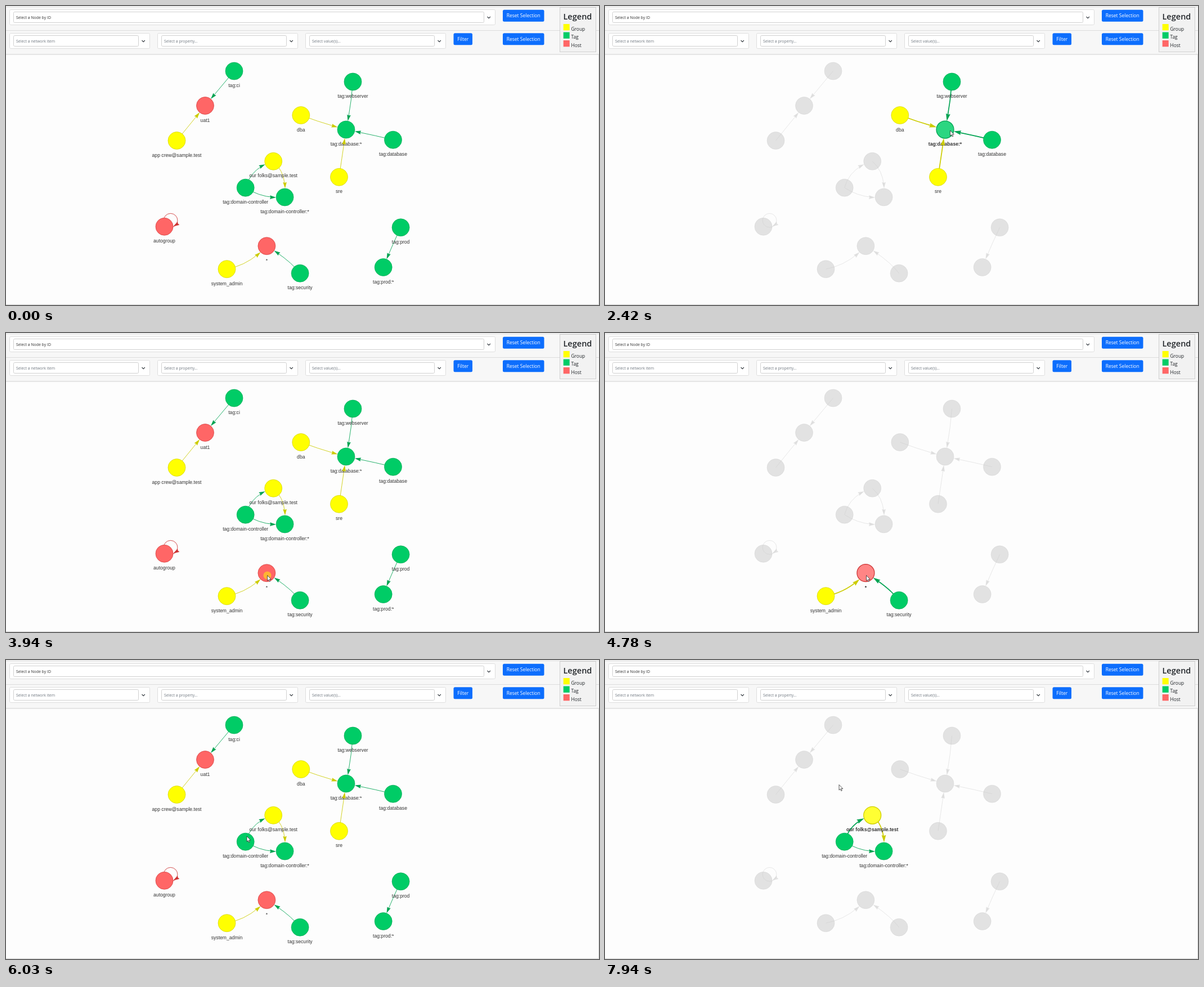
Animation, 1054 px wide and 531 px high, one loop 8000 ms. Source, as an HTML page:

```html
<!DOCTYPE html>
<html lang="en">
<head>
<meta charset="utf-8">
<title>Access graph</title>
<style>
  html, body { margin: 0; width: 100%; height: 100%; overflow: hidden; background: #fdfdfd; }
  svg { display: block; width: 1054px; height: 531px; }
  #bar text { font-family: "Open Sans", "Noto Sans", sans-serif; fill: #212529; }
  #graph text { font: 8.65px "Liberation Sans", Arial, sans-serif; fill: #343434; text-anchor: middle; }
  #graph text.picked { font-weight: bold; }
</style>
</head>
<body>
<svg viewBox="0 0 1054 531">
  <rect width="1054" height="531" fill="#fdfdfd"/>
  <g id="bar"></g>
  <g id="graph"></g>
  <circle id="click" r="7" fill="#ff0" fill-opacity=".5"/>
  <path id="cursor" d="M0 0V9.6L2.2 7.6L3.8 11L5.3 10.3L3.8 7H6.8Z" fill="#fff" stroke="#222" stroke-width=".75"/>
</svg>
<script>
const LOOP = 8000, R = 15.5, FADED = 'rgba(200,200,200,.5)';
const el = id => document.getElementById(id);

// fill, border and edge, fill when selected
const palette = {
  yellow: ['#ffff00', '#cccc00', '#ffff33'],
  green: ['#00cc66', '#00a352', '#2bd681'],
  red: ['#ff6666', '#cc3333', '#ff8585']
};

const nodes = {
  ci: [405.5, 115.5, 'green', 'tag:ci'],
  uat: [354, 177, 'red', 'uat1'],
  dev: [303.5, 239, 'yellow', 'app crew@sample.test'],
  web: [616.5, 134.5, 'green', 'tag:webserver'],
  dba: [524.3, 194, 'yellow', 'dba'],
  dbAll: [604.5, 219.5, 'green', 'tag:database:*'],
  db: [688, 237.7, 'green', 'tag:database'],
  sre: [592, 303.8, 'yellow', 'sre'],
  staff: [475.2, 275.8, 'yellow', 'our folks@sample.test'],
  dc: [425.7, 322.7, 'green', 'tag:domain-controller'],
  dcAll: [495.6, 339.5, 'green', 'tag:domain-controller:*'],
  auto: [281.5, 391.8, 'red', 'autogroup'],
  star: [463.4, 426.2, 'red', '*'],
  sys: [392.5, 467.2, 'yellow', 'system_admin'],
  sec: [522.6, 474.7, 'green', 'tag:security'],
  prod: [701.6, 393.3, 'green', 'tag:prod'],
  prodAll: [670.7, 464, 'green', 'tag:prod:*']
};

// from, to, offset of the control point from the midpoint
const edges = [
  ['ci', 'uat', 0, 0], ['dev', 'uat', 0, 0],
  ['web', 'dbAll', 3, 0], ['dba', 'dbAll', -2, 1.5], ['db', 'dbAll', 0, -1], ['sre', 'dbAll', 0, 0],
  ['dc', 'staff', -15, -12], ['staff', 'dcAll', 14, -11], ['dc', 'dcAll', -4, 12],
  ['sys', 'star', 5, 13], ['sec', 'star', 12, 1], ['prod', 'prodAll', -1.5, 0]
];

const selections = [['dbAll', 1490, 2484], ['star', 4070, 5510], ['staff', 6770, LOOP]];
const clicks = [[1370, 1430], [3940, 4070], [5450, 5510]];

// time, x, y of the pointer tip
const track = [
  [396, 960, 512], [1090, 613.5, 221], [2356, 613.5, 221], [2490, 540, 265], [2690, 413.8, 363.8],
  [2876, 413.8, 363.8], [3100, 470, 402], [3330, 551, 469], [3720, 464.5, 430.5],
  [4716, 464.5, 430.5], [5450, 580.5, 391], [5570, 514, 364.5], [6030, 428, 313],
  [6160, 419.5, 298], [6290, 440, 261.5], [6420, 472.5, 272.5], [7756, 472.5, 272.5], [7940, 416, 221.5]
];

const text = (x, y, size, label, extra = '') =>
  `<text x="${x}" y="${y}" font-size="${size}" ${extra}>${label}</text>`;
const box = (x, y, w, h, fill, stroke = 'none', r = 0) =>
  `<rect x="${x}" y="${y}" width="${w}" height="${h}" rx="${r}" fill="${fill}" stroke="${stroke}"/>`;
const rule = (x1, y1, x2, y2, color) => `<path d="M${x1} ${y1}L${x2} ${y2}" stroke="${color}"/>`;

function select(x, y, w, label, color) {
  return box(x + .5, y + .5, w, 27, '#fff', '#dedede', 2) +
    box(x + 7.5, y + 4.5, w - 27, 19, '#fff', '#d0d0d0', 2) +
    text(x + 12, y + 16.8, 6.9, label, `style="fill:${color}"`) +
    `<path d="M${x + w - 13.5} ${y + 13}l2.7 2.7l2.7 -2.7" fill="none" stroke="#343a40" stroke-width="1.1"/>`;
}

function button(x, y, w, label) {
  return box(x, y, w, 21, '#0d6efd', 'none', 2.5) +
    text(x + w / 2, y + 13.5, 8.5, label, 'text-anchor="middle" style="fill:#fff"');
}

function drawBar() {
  const legend = [['yellow', 'Group'], ['green', 'Tag'], ['red', 'Host']].map(([color, label], i) =>
    box(990.7, 32 + i * 14.5, 11, 11.3, palette[color][0]) + text(1004.5, 43.5 + i * 14.5, 8.4, label));
  el('bar').innerHTML =
    box(0, 1, 1054, 85, '#f7f7f7') +
    rule(0, 1.5, 1054, 1.5, '#dcdcdc') + rule(0, 43.5, 1054, 43.5, '#dcdcdc') +
    rule(0, 86, 1054, 86, '#cfcfcf') + rule(0, 530.3, 1054, 530.3, '#cfcfcf') +
    rule(1053.5, 86, 1053.5, 531, '#d8d8d8') +
    select(6, 6, 863, 'Select a Node by ID', '#303030') +
    select(6, 48, 249, 'Select a network item', '#707880') +
    select(269, 48, 249, 'Select a property...', '#707880') +
    select(532, 48, 249, 'Select value(s)...', '#707880') +
    button(883, 6.7, 73.5, 'Reset Selection') + button(883, 48.2, 73.5, 'Reset Selection') +
    button(795.5, 48.2, 33.5, 'Filter') +
    box(984.5, 2.5, 64, 79, '#f2f2f2', '#cfcfcf') +
    text(990.5, 24, 14.5, 'Legend', 'font-weight="600"') + legend.join('');
}

const mix = (a, b, p) => [a[0] + (b[0] - a[0]) * p, a[1] + (b[1] - a[1]) * p];

function arrow([x, y], angle, color, thick) {
  return `<path transform="translate(${x} ${y}) rotate(${angle * 180 / Math.PI}) scale(${thick ? 13 : 11})"
    d="M0 0L-1 .3L-.9 0L-1 -.3Z" fill="${color}"/>`;
}

function drawGraph(selected) {
  const near = new Set([selected]);
  for (const [from, to] of edges) {
    if (from === selected) near.add(to);
    if (to === selected) near.add(from);
  }
  const active = id => !selected || near.has(id);
  const edgeColor = id => active(id) ? palette[nodes[id][2]][1] : FADED;
  let lines = '', discs = '', heads = '';

  for (const [from, to, dx, dy] of edges) {
    const a = nodes[from], b = nodes[to], middle = mix(a, b, .5);
    const c = [middle[0] + dx, middle[1] + dy];
    const at = p => mix(mix(a, c, p), mix(c, b, p), p);
    let tip = 1;
    while (Math.hypot(at(tip)[0] - b[0], at(tip)[1] - b[1]) < R) tip -= .002;
    const back = mix(a, c, tip), ahead = mix(c, b, tip), end = tip - .06;
    const thick = from === selected || to === selected, color = edgeColor(from);
    lines += `<path d="M${a[0]} ${a[1]}Q${mix(a, c, end)} ${at(end)}" fill="none"
      stroke="${color}" stroke-width="${thick ? 1.7 : .85}"/>`;
    heads += arrow(at(tip), Math.atan2(ahead[1] - back[1], ahead[0] - back[0]), color, thick);
  }

  const [x, y] = nodes.auto;
  lines += `<circle cx="${x + 11}" cy="${y - 11}" r="12.4" fill="none" stroke="${edgeColor('auto')}" stroke-width=".85"/>`;
  heads += arrow([x + 15.7, y - .2], 2.6, edgeColor('auto'), false);

  for (const [id, [x, y, color, label]] of Object.entries(nodes)) {
    const [fill, border, bright] = palette[color], picked = id === selected, on = active(id);
    discs += `<circle cx="${x}" cy="${y}" r="${R}" fill="${on ? picked ? bright : fill : FADED}"
      stroke="${on ? border : FADED}" stroke-width="${picked ? 1.25 : .65}"/>`;
    if (on) discs += `<text x="${x}" y="${y + 28.6}" class="${picked ? 'picked' : ''}">${label}</text>`;
  }
  el('graph').innerHTML = lines + discs + heads;
}

// The pointer advances in short steps, as in a screen recording.
function pointerAt(t) {
  const i = track.findIndex(k => k[0] > t);
  if (i < 0) return track[track.length - 1].slice(1);
  if (i === 0) return track[0].slice(1);
  const a = track[i - 1], b = track[i], span = b[0] - a[0];
  const steps = Math.max(1, Math.round(span / 64));
  return mix(a.slice(1), b.slice(1), Math.floor((t - a[0]) / span * steps) / steps);
}

const during = (t, start, end) => t >= start && t < end;
let shown = null;

function frame() {
  const t = performance.now() % LOOP;
  const selected = (selections.find(s => during(t, s[1], s[2])) || [''])[0];
  if (selected !== shown) drawGraph(shown = selected);
  const place = `translate(${pointerAt(t)})`;
  for (const id of ['cursor', 'click']) el(id).setAttribute('transform', place);
  el('cursor').setAttribute('visibility', t >= 460 ? 'visible' : 'hidden');
  el('click').setAttribute('visibility', clicks.some(c => during(t, ...c)) ? 'visible' : 'hidden');
  requestAnimationFrame(frame);
}

drawBar();
frame();
</script>
</body>
</html>
```
